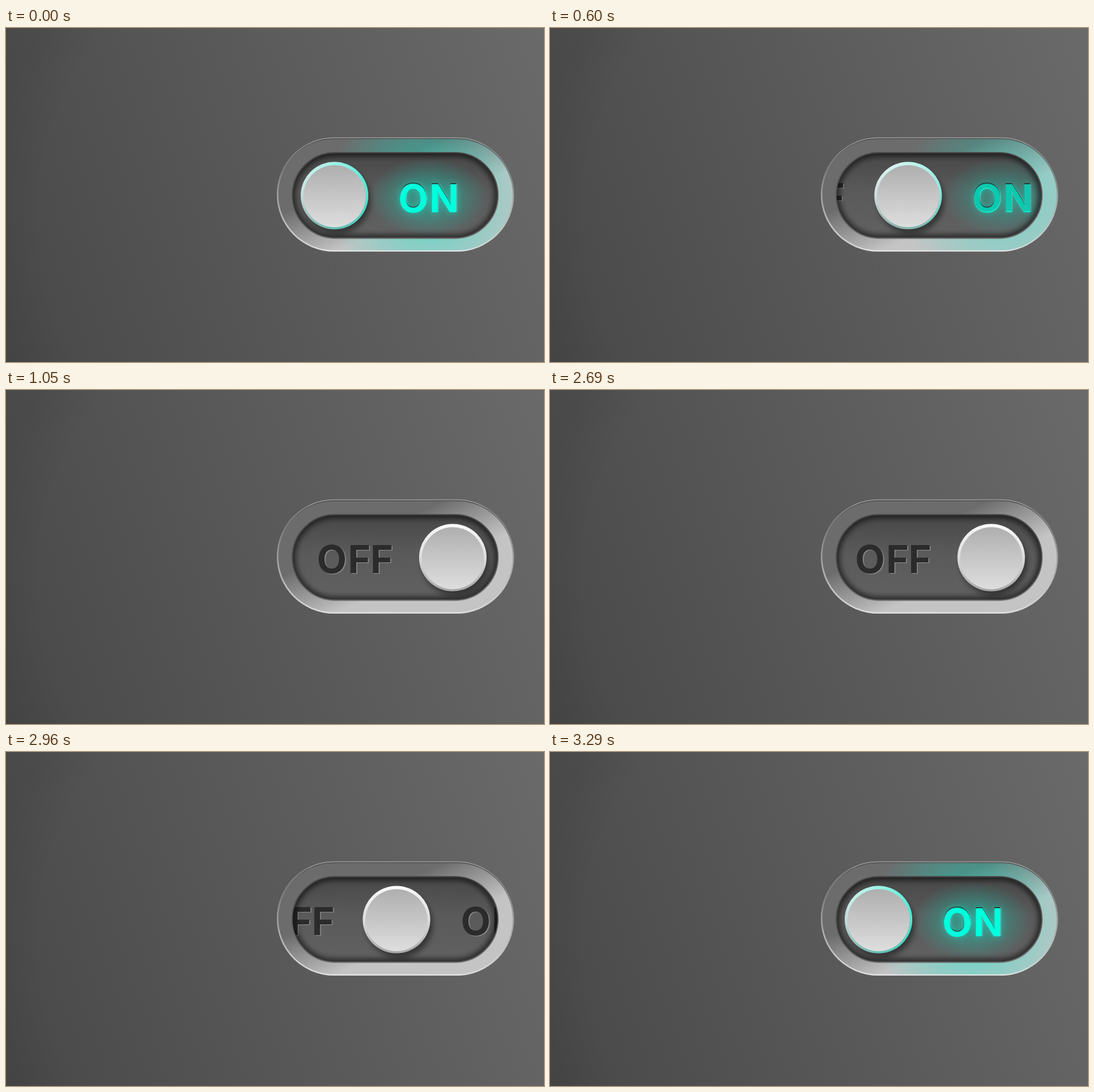
An HTML page that plays this animation: 900 by 560 pixels, repeating every 4.29 s.

```html
<!DOCTYPE html>
<html lang="en">
<head>
<meta charset="utf-8">
<title>Toggle switch</title>
<style>
  /* --p is the knob position: 0 = left (on), 1 = right (off) */
  @property --p { syntax: "<number>"; inherits: true; initial-value: 0; }

  html, body { margin: 0; width: 100%; height: 100%; overflow: hidden; }
  body {
    background:
      radial-gradient(circle at 585px 320px, transparent 525px, rgba(0, 0, 0, .06) 610px),
      linear-gradient(70deg, #484848, #6a6a6a);
  }
  svg {
    display: block;
    width: 900px;
    height: 560px;
    --lit: calc(1 - 4 * var(--p) * var(--p));
    animation: slide 4290ms infinite;
  }
  @keyframes slide {
    0% { --p: 0; }
    10.489% { --p: 0; animation-timing-function: steps(20); }
    24.475% { --p: 1; }
    62.004% { --p: 1; animation-timing-function: steps(21); }
    76.689%, 100% { --p: 0; }
  }

  .knob { transform: translateX(calc(var(--p) * 198px)); }
  .on { transform: translateX(calc(var(--p) * 200px)); }
  .off { transform: translateX(calc((var(--p) - 1) * 206px)); }
  .lit { opacity: max(0, 1 - 4 * var(--p) * var(--p)); }

  text { font: 700 65px Inter, "Liberation Sans", sans-serif; }
  .engraved { fill: #2b2b2b; text-shadow: 1.5px 1.5px 1px rgba(255, 255, 255, .32); }
  .neon { fill: #00ffdd; text-shadow: 0 0 12px rgba(0, 255, 221, .5); }
</style>
</head>
<body>
<svg viewBox="0 0 900 560">
  <defs>
    <linearGradient id="edge" x2="0" y2="1">
      <stop stop-color="#a8a8a8"/>
      <stop offset=".3" stop-color="#858585"/>
      <stop offset="1" stop-color="#d6d6d6"/>
    </linearGradient>
    <linearGradient id="bevel" x2="0" y2="1">
      <stop stop-color="#4c4c4c"/>
      <stop offset=".5" stop-color="#a0a0a0"/>
      <stop offset="1" stop-color="#e2e2e2"/>
    </linearGradient>
    <linearGradient id="rim" gradientUnits="userSpaceOnUse" x1="579.5" y1="124.5" x2="723.5" y2="433.5">
      <stop offset=".35" stop-color="#6c6c6c"/>
      <stop offset=".63" stop-color="#c4c4c4"/>
    </linearGradient>
    <linearGradient id="slot" x2="0" y2="1">
      <stop stop-color="#474747"/>
      <stop offset=".45" stop-color="#5a5a5a"/>
      <stop offset="1" stop-color="#616161"/>
    </linearGradient>
    <linearGradient id="slotEdge" x2="0" y2="1">
      <stop stop-color="#484848"/>
      <stop offset="1" stop-color="#6a6a6a"/>
    </linearGradient>
    <linearGradient id="ring" x2="0" y2="1">
      <stop stop-color="#fafafa"/>
      <stop offset=".5" stop-color="#dcdcdc"/>
      <stop offset="1" stop-color="#a6a6a6"/>
    </linearGradient>
    <linearGradient id="face" x2="0" y2="1">
      <stop stop-color="#afafaf"/>
      <stop offset="1" stop-color="#dedede"/>
    </linearGradient>
    <linearGradient id="ringTint" x2="1" y2="0">
      <stop stop-color="#00e6c8" stop-opacity=".12"/>
      <stop offset="1" stop-color="#00e6c8" stop-opacity=".62"/>
    </linearGradient>
    <radialGradient id="rimTint">
      <stop offset=".42" stop-color="#00e6c8" stop-opacity=".36"/>
      <stop offset="1" stop-color="#00e6c8" stop-opacity="0"/>
    </radialGradient>
    <radialGradient id="glow">
      <stop stop-color="#00f5d4" stop-opacity=".42"/>
      <stop offset=".5" stop-color="#00f5d4" stop-opacity=".24"/>
      <stop offset="1" stop-color="#00f5d4" stop-opacity="0"/>
    </radialGradient>
    <filter id="soft" x="-30%" y="-30%" width="160%" height="160%">
      <feGaussianBlur stdDeviation="5"/>
    </filter>
    <rect id="slotShape" x="478.5" y="209" width="344.5" height="143.5" rx="71.75"/>
    <clipPath id="rimClip"><rect x="455" y="186" width="393" height="187" rx="93.5"/></clipPath>
    <clipPath id="slotClip"><use href="#slotShape"/></clipPath>
  </defs>

  <!-- rim -->
  <rect x="453" y="183.5" width="397" height="191.5" rx="95.75" fill="url(#edge)"/>
  <rect x="454" y="184.7" width="395" height="189.3" rx="94.6" fill="url(#bevel)"/>
  <rect x="455.5" y="186.2" width="392" height="186.3" rx="93.1" fill="url(#rim)"/>
  <g clip-path="url(#rimClip)">
    <g class="on"><circle class="lit" cx="706" cy="281" r="170" fill="url(#rimTint)"/></g>
  </g>

  <!-- slot and lettering -->
  <use href="#slotShape" fill="url(#slot)"/>
  <g clip-path="url(#slotClip)">
    <g class="on">
      <ellipse class="lit" cx="706" cy="284" rx="100" ry="66" fill="url(#glow)"/>
      <text class="engraved" x="656 708" y="306.5">ON</text>
    </g>
    <text class="engraved off" x="520 572 609.5" y="306.5">OFF</text>
    <use href="#slotShape" fill="none" stroke="#000" stroke-opacity=".6" stroke-width="12" filter="url(#soft)"/>
    <g class="on"><text class="neon lit" x="656 708" y="308.5">ON</text></g>
  </g>
  <use href="#slotShape" fill="none" stroke="url(#slotEdge)" stroke-width="2"/>

  <!-- knob -->
  <g clip-path="url(#slotClip)">
    <g class="knob"><circle cx="554" cy="289" r="56" fill-opacity=".45" filter="url(#soft)"/></g>
  </g>
  <g class="knob">
    <circle cx="549.5" cy="281" r="56.5" fill="url(#ring)"/>
    <g class="lit"><circle class="lit" cx="549.5" cy="281" r="56.5" fill="url(#ringTint)"/></g>
    <circle cx="549.5" cy="282" r="52" fill="url(#face)"/>
  </g>
</svg>
</body>
</html>
```
